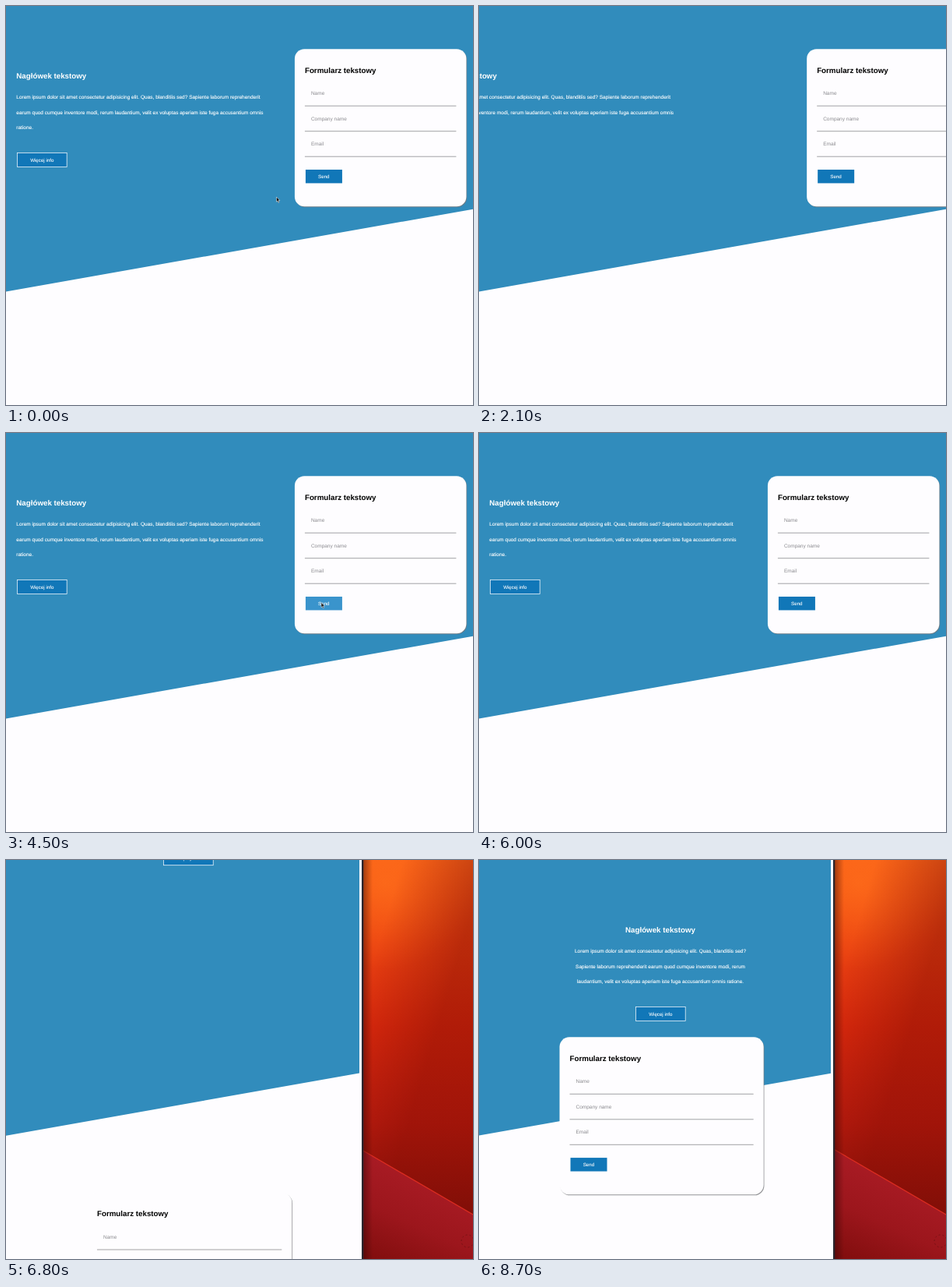
An HTML page for the animation above (8.8 s loop, 600 px wide and 512 px high).

```html
<!DOCTYPE html>
<html lang="pl">
<head>
<meta charset="utf-8">
<title>Formularz tekstowy</title>
<style>
  html, body { margin: 0; width: 100%; height: 100%; overflow: hidden; background: #fefdff; }
  svg { display: block; width: 600px; height: 512px; }
  text { font-family: "Liberation Sans", Arial, sans-serif; font-size: 6.5px; text-rendering: geometricPrecision; }
  .title { font-size: 9.75px; font-weight: bold; }
  .copy { fill: #fff; stroke: #fff; stroke-width: .12px; }
  .label { font-size: 6.2px; fill: #fff; stroke: #fff; stroke-width: .08px; text-anchor: middle; }
  .hint { fill: #8a8a8e; }
  .rule { stroke: #8b8b8f; stroke-width: .8px; }
</style>
</head>
<body>
<svg viewBox="0 0 600 512">
  <defs>
    <linearGradient id="sky" x1="0" y1="0" x2="0" y2="1">
      <stop offset="0" stop-color="#f9651a"/>
      <stop offset=".2" stop-color="#ea4412"/>
      <stop offset=".42" stop-color="#d9290d"/>
      <stop offset=".66" stop-color="#be1d10"/>
      <stop offset=".88" stop-color="#8a130c"/>
    </linearGradient>
    <radialGradient id="glow" gradientUnits="userSpaceOnUse" cx="488" cy="30" r="110">
      <stop offset="0" stop-color="#ff6d1a" stop-opacity=".7"/>
      <stop offset="1" stop-color="#ff6014" stop-opacity="0"/>
    </radialGradient>
    <linearGradient id="dusk" gradientUnits="userSpaceOnUse" x1="510" y1="0" x2="610" y2="30">
      <stop offset="0" stop-color="#780800" stop-opacity="0"/>
      <stop offset="1" stop-color="#780800" stop-opacity=".42"/>
    </linearGradient>
    <linearGradient id="facet" gradientUnits="userSpaceOnUse" x1="540" y1="410" x2="490" y2="520">
      <stop offset="0" stop-color="#a81b24"/>
      <stop offset=".5" stop-color="#9c161c"/>
      <stop offset="1" stop-color="#820e0e"/>
    </linearGradient>
    <linearGradient id="shade">
      <stop offset="0" stop-color="#200" stop-opacity=".4"/>
      <stop offset="1" stop-color="#200" stop-opacity="0"/>
    </linearGradient>
    <clipPath id="view"><rect id="viewBox" width="603" height="512"/></clipPath>
  </defs>

  <g id="desktop">
    <rect x="440" width="160" height="512" fill="url(#sky)"/>
    <rect x="440" width="160" height="512" fill="url(#glow)"/>
    <rect x="440" width="160" height="512" fill="url(#dusk)"/>
    <path d="M440 362L600 455V512H440Z" fill="url(#facet)"/>
    <path d="M440 362L600 455" stroke="#dc2c20" stroke-width="1.3"/>
    <circle cx="593" cy="489" r="8" fill="none" stroke="#6c1212" stroke-width=".8" stroke-dasharray="2 3"/>
  </g>
  <rect id="shadow" width="12" height="512" fill="url(#shade)"/>
  <rect id="edge" width="2.3" height="512" fill="#2b262e"/>

  <g clip-path="url(#view)">
    <rect id="page" height="512" fill="#fefdff"/>
    <path id="hero" fill="#318cbc"/>
    <g id="intro">
      <text id="heading" class="title" fill="#fff" y="92.6">Nagłówek tekstowy</text>
      <g id="copy" class="copy"></g>
      <g id="more">
        <rect id="moreBox" x=".4" y="188.4" width="63.8" height="18" stroke="#e9f3fa" stroke-width=".8"/>
        <text class="label" x="32.3" y="200.2">Więcej info</text>
      </g>
    </g>
    <g id="form">
      <rect id="cardShadow" x=".8" y="1" height="202" rx="12.5" fill="#77787c" fill-opacity=".8"/>
      <rect id="card" height="202" rx="12.5" fill="#fefdff"/>
      <text class="title" x="13" y="30.4">Formularz tekstowy</text>
      <g id="fields"></g>
      <rect id="sendBox" x="14" y="154.8" width="47" height="17.4"/>
      <text class="label" x="37.4" y="166.2">Send</text>
    </g>
  </g>
  <path id="cursor" d="M0 0V6.2L1.4 5L2.4 7.4L3.5 6.9L2.5 4.6H4.4Z" fill="#111" stroke="#fff" stroke-width=".5"/>
</svg>
<script>
const LOOP = 8800, STEP = 100;
const SLIDE = 2000, SLIDE_IN = 1000, RISE_IN = 6560;
const COPY = "Lorem ipsum dolor sit amet consectetur adipisicing elit. Quas, blanditiis sed? " +
  "Sapiente laborum reprehenderit earum quod cumque inventore modi, rerum laudantium, " +
  "velit ex voluptas aperiam iste fuga accusantium omnis ratione.";
const SLOPE = Math.tan(Math.PI / 18);

// [time, value...] tracks
const WIDTH = [[6000, 600], [6300, 545], [6560, 478], [6800, 454], [7000, 452]];
const POINTER = [[2700, 312, 344], [2800, 296, 320], [3000, 234.5, 206.5], [3200, 150, 204],
  [3450, 150, 204], [3600, 52, 198], [3900, 56, 199], [4050, 200, 140], [4200, 400, 216],
  [4800, 410, 219], [5000, 500, 120], [5200, 592, 22], [5300, 604, 20]];

const el = id => document.getElementById(id);
const set = (node, attrs) => { for (const k in attrs) node.setAttribute(k, attrs[k]); };
const move = (id, x, y) => set(el(id), { transform: `translate(${x} ${y})` });
const clamp = v => Math.min(1, Math.max(0, v));

function add(parent, tag, attrs, text = "") {
  const node = document.createElementNS("http://www.w3.org/2000/svg", tag);
  set(node, attrs);
  node.textContent = text;
  return parent.appendChild(node);
}

function track(keys, t) {
  const last = keys[keys.length - 1];
  if (t <= keys[0][0]) return keys[0].slice(1);
  if (t >= last[0]) return last.slice(1);
  const i = keys.findIndex(k => k[0] > t);
  const a = keys[i - 1], b = keys[i], p = (t - a[0]) / (b[0] - a[0]);
  return a.slice(1).map((v, n) => v + (b[n + 1] - v) * p);
}

// CSS "ease": cubic-bezier(.25, .1, .25, 1)
function ease(p) {
  p = clamp(p);
  let lo = 0, hi = 1;
  for (let i = 0; i < 24; i++) {
    const s = (lo + hi) / 2;
    if (.75 * s * (1 - s) + s ** 3 < p) lo = s; else hi = s;
  }
  return .3 * lo * (1 - lo) ** 2 + 3 * lo * lo * (1 - lo) + lo ** 3;
}
const remaining = (t, start) => t < start ? 0 : 1 - ease((t - start) / SLIDE);

const pen = document.createElement("canvas").getContext("2d");
pen.font = '65px "Liberation Sans", Arial, sans-serif';
function wrap(text, width) {
  const lines = [""];
  for (const word of text.split(" ")) {
    const line = lines[lines.length - 1];
    const next = line ? line + " " + word : word;
    if (line && pen.measureText(next).width / 10 > width) lines.push(word);
    else lines[lines.length - 1] = next;
  }
  return lines;
}

const rules = ["Name", "Company name", "Email"].map((name, i) => {
  const y = 73 + i * 32.5;
  add(el("fields"), "text", { class: "hint", x: 21, y: y - 13.8 }, name);
  return add(el("fields"), "line", { class: "rule", x1: 13, y1: y, y2: y });
});

// fades in over the button and out again
const hover = (t, from, to) => ease((t - from) / 500) - ease((t - to) / 500);
const tint = h => `rgb(${17 + 45 * h},${119 + 32 * h},${184 + 22 * h})`;

function layout(w, narrow) {
  const cardWidth = w * (narrow ? .58 : .3675);
  const mid = w * .5155;
  const x = narrow ? mid : 13.3;
  const anchor = narrow ? "middle" : "start";

  set(el("viewBox"), { width: w + 3 });
  set(el("page"), { width: w + 3 });
  set(el("edge"), { x: w + 3 });
  set(el("shadow"), { x: w + 5 });
  const drop = SLOPE * w / 2;
  set(el("hero"), { d: `M0 0H${w}V${313.6 - drop}L0 ${313.6 + drop}Z` });

  set(el("heading"), { x, "text-anchor": anchor });
  el("copy").replaceChildren();
  wrap(COPY, w * (narrow ? .58 : .59) - 26).forEach((line, i) =>
    add(el("copy"), "text", { x, y: 119.1 + i * 19.5, "text-anchor": anchor }, line));
  move("more", narrow ? mid - 32 : 14, 0);

  set(el("card"), { width: cardWidth });
  set(el("cardShadow"), { width: cardWidth });
  rules.forEach(r => set(r, { x2: cardWidth - 13 }));
  return narrow ? [w * .229, 227.3] : [w * .6182, 55.2];
}

function pointer(t) {
  if (t < 100) return [347.5, 245];
  if (t < 300) return [417, 54.5];
  return t >= 2700 && t < 5300 ? track(POINTER, t) : [-20, -20];
}

function draw(t) {
  const narrow = t >= RISE_IN;
  const [formX, formY] = layout(track(WIDTH, t)[0], narrow);
  const side = narrow ? 0 : remaining(t, SLIDE_IN);
  const rise = 229 * remaining(t, RISE_IN);
  move("intro", -528 * side, -rise);
  move("form", formX + 330 * side, formY + rise);
  set(el("moreBox"), { fill: tint(hover(t, 3550, 3950)) });
  set(el("sendBox"), { fill: tint(hover(t, 4180, 4900)) });
  move("cursor", ...pointer(t));
}

function tick() {
  const t = performance.now() % LOOP;
  draw(t - t % STEP);
  requestAnimationFrame(tick);
}
tick();
</script>
</body>
</html>
```
